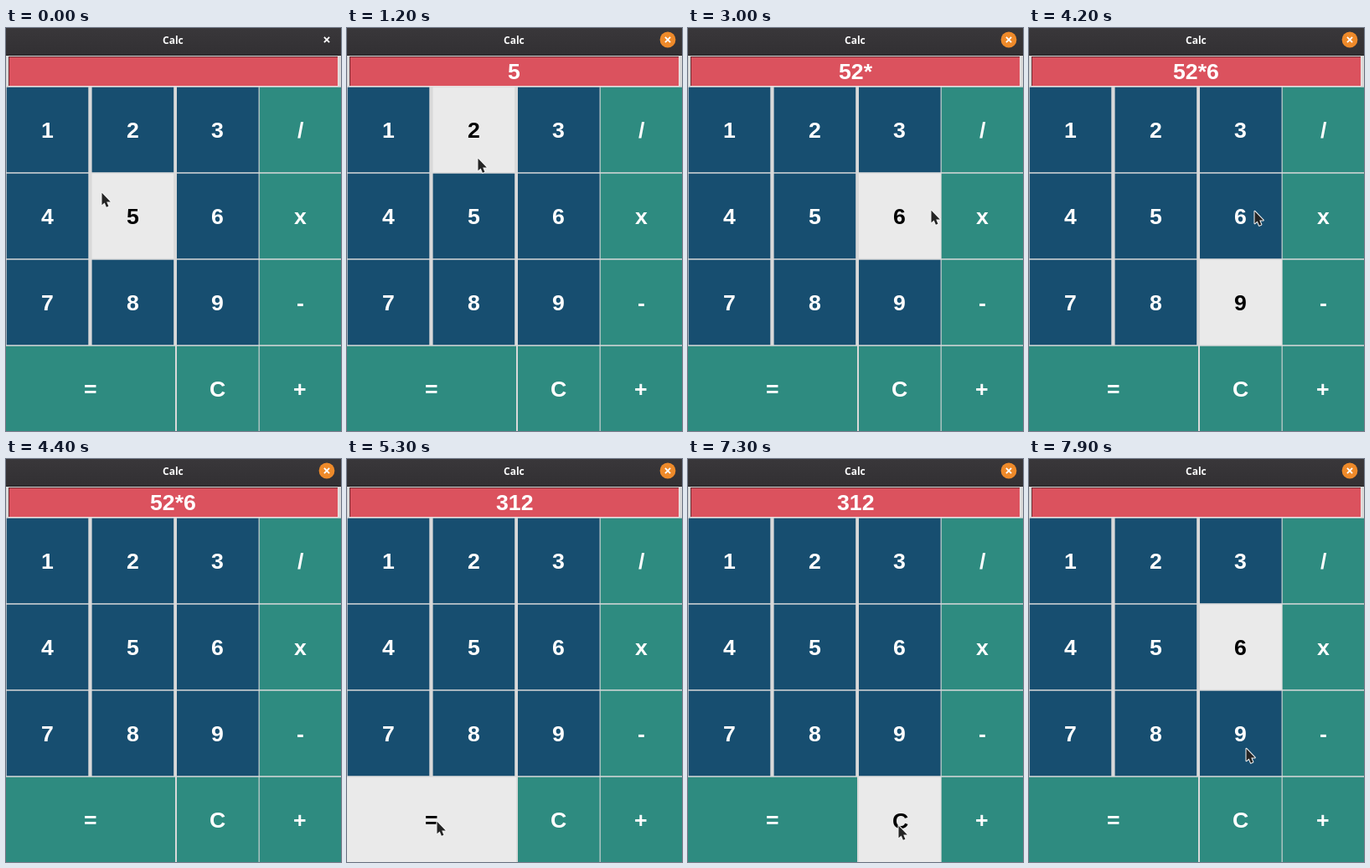
These frames come from a looping animation (400x481 px, 8000 ms). An HTML page with a canvas:

```html
<!DOCTYPE html>
<html lang="en">
<head>
<meta charset="utf-8">
<title>Calc</title>
<style>
  html, body { margin: 0; width: 100%; height: 100%; overflow: hidden; }
  canvas { display: block; }
</style>
</head>
<body>
<canvas id="stage" width="400" height="481"></canvas>
<script>
const ctx = document.getElementById('stage').getContext('2d');
const LOOP = 8000, STEP = 100;
const BLUE = '#174e70', TEAL = '#2e8b80', HOVER = '#eaeaea', GAP = '#d9d9d9';
const BIG = 'bold 26.67px "Liberation Sans", Arial, sans-serif';
const SMALL = 'bold 12px "Noto Sans", sans-serif';

const COLS = [0.7, 102.6, 204, 302.7], KEY_W = 97.6, KEY_H = 101.5;
const makeKey = (label, col, row) => ({
  label, x: COLS[col], y: 70.7 + 103 * row, w: KEY_W,
  color: col < 3 && row < 3 ? BLUE : TEAL
});
const keys = [
  ...[...'123/456x789-'].map((label, i) => makeKey(label, i % 4, i >> 2)),
  { ...makeKey('=', 0, 3), x: 0, w: 202 }, makeKey('C', 2, 3), makeKey('+', 3, 3)
];

// Each move eases to (x, y), optionally bowed sideways.
const origin = { x: 114, y: 196 };
const moves = [
  { from: 200, to: 600, x: 138, y: 225 },
  { from: 1000, to: 1300, x: 162, y: 131 },
  { from: 1700, to: 2400, x: 349, y: 216, bow: 30 },
  { from: 2800, to: 3100, x: 269, y: 218 },
  { from: 4200, to: 4500, x: 150, y: 518 },
  { from: 4600, to: 4700, x: 107, y: 432 },
  { from: 6600, to: 6900, x: 251, y: 437, bow: -80 },
  { from: 7800, to: 8000, x: 267, y: 253 }
];
const clicks = [700, 1600, 2500, 3600, 5200, 7300];

function pointerAt(t) {
  let pos = origin;
  for (const { from, to, x, y, bow = 0 } of moves) {
    if (t <= from) break;
    const k = Math.min(1, (t - from) / (to - from)), s = k * k * (3 - 2 * k);
    const dx = x - pos.x, dy = y - pos.y;
    const side = 4 * s * (1 - s) * bow / Math.hypot(dx, dy);
    pos = { x: pos.x + dx * s - dy * side, y: pos.y + dy * s + dx * side };
  }
  return pos;
}

// The highlight runs one step ahead of the drawn pointer.
function hoveredAt(t) {
  const { x, y } = pointerAt(t + STEP);
  return keys.find(k => x >= k.x && x < k.x + k.w && y >= k.y && y < k.y + KEY_H);
}

function enter(expr, label) {
  if (label === 'C') return '';
  if (label === '=') return String(expr.split('*').reduce((a, b) => a * b));
  return expr + (label === 'x' ? '*' : label);
}

const readoutAt = t => clicks.filter(c => c < t)
  .reduce((expr, c) => enter(expr, hoveredAt(c).label), '');

function rect(x, y, w, h, color) {
  ctx.fillStyle = color;
  ctx.fillRect(x, y, w, h);
}

// Centred text, snapped to whole pixels.
function text(str, center, baseline, font, color) {
  ctx.font = font;
  ctx.fillStyle = color;
  const left = center - ctx.measureText(str).width / 2 - 0.25;
  ctx.fillText(str, Math.round(left), Math.round(baseline));
}

function drawTitleBar(focused) {
  const shade = ctx.createLinearGradient(0, 0, 0, 33);
  shade.addColorStop(0, '#39373a');
  shade.addColorStop(1, '#323033');
  rect(0, 0, 400, 33, shade);
  rect(0, 32, 400, 1, '#222022');
  text('Calc', 200, 19, SMALL, '#fff');
  if (focused) {
    ctx.fillStyle = '#ee8a2a';
    ctx.beginPath();
    ctx.arc(383, 14, 9.4, 0, Math.PI * 2);
    ctx.fill();
  }
  ctx.strokeStyle = '#fff';
  ctx.lineWidth = 1.8;
  ctx.stroke(new Path2D('M379.9 10.9l6.2 6.2m0-6.2l-6.2 6.2'));
}

function drawReadout(str) {
  rect(3, 34, 394, 36, '#f0dfe0');
  rect(3, 34, 393, 35, '#6f2a31');
  rect(4, 35, 392, 34, '#db525e');
  text(str, 200, 61, BIG, '#fff');
}

function drawKey({ label, x, y, w, color }, hovered, pressed) {
  const shift = hovered && pressed ? 1 : 0;
  rect(x, y, w, KEY_H, hovered ? HOVER : color);
  text(label, x + w / 2 + shift, y + 60 + shift, BIG, hovered ? '#000' : '#fff');
}

const arrow = new Path2D('M0 0V14.5L3.2 11.6L5.4 17L7.9 15.9L5.7 10.7H10.3Z');
function drawPointer({ x, y }) {
  ctx.save();
  ctx.translate(Math.round(x) + 0.5, Math.round(y) + 0.8);
  ctx.lineJoin = 'round';
  ctx.lineWidth = 2;
  ctx.strokeStyle = '#f4f4f4';
  ctx.stroke(arrow);
  ctx.fillStyle = '#252525';
  ctx.fill(arrow);
  ctx.restore();
}

function draw(now) {
  const t = Math.floor((now % LOOP) / STEP) * STEP;
  const hovered = hoveredAt(t), pressed = clicks.includes(t);
  rect(0, 0, 400, 481, GAP);
  drawTitleBar(t >= clicks[0]);
  drawReadout(readoutAt(t));
  for (const key of keys) drawKey(key, key === hovered, pressed);
  if (hovered) drawPointer(pointerAt(t));
}

const start = performance.now();
function tick() {
  draw(performance.now() - start);
  requestAnimationFrame(tick);
}
tick();
</script>
</body>
</html>
```
